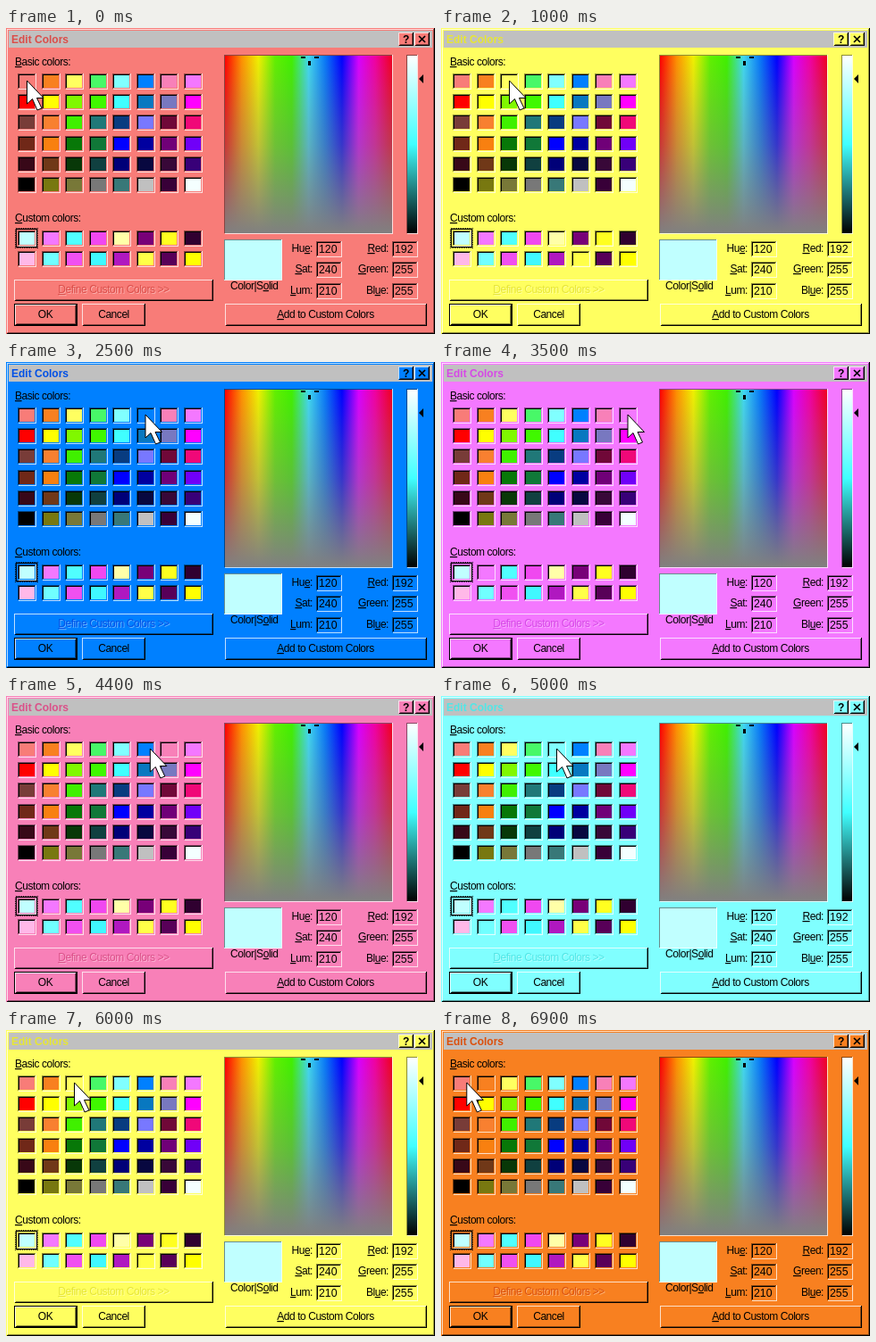
Write an HTML page that moves like this. It is 480 by 343 pixels and loops after 7000 ms.

```html
<!DOCTYPE html>
<html lang="en">
<head>
<meta charset="utf-8">
<title>Edit Colors</title>
<style>
  html, body { margin: 0; width: 100%; height: 100%; overflow: hidden; }
  svg { display: block; width: 480px; height: 343px; --face: #f87c78; --dim: #d44a46; }
  text { font: 12px "Liberation Sans", Arial, sans-serif; letter-spacing: -.45px; fill: #000; white-space: pre; }
  .title { font-weight: bold; letter-spacing: 0; fill: var(--dim); }
  .value { font-size: 12.3px; letter-spacing: 0; }
  .face { fill: var(--face); }
  .none { fill: none; }
  .hi { fill: none; stroke: #fff; stroke-opacity: .75; }
  .lo { fill: none; stroke: #000; stroke-opacity: .45; }
  .dark { fill: none; stroke: #000; }
  .u { text-decoration: underline; }
  rect, .hi, .lo, .dark { shape-rendering: crispEdges; }
</style>
</head>
<body>
<svg id="stage" viewBox="0 0 480 343"></svg>
<script>
const stage = document.getElementById('stage');
const basic = [
  'f87c78 f88020 ffff60 48f868 80ffff 0080ff f880b8 f478ff',
  'ff0000 ffff00 80f800 40f800 40ffff 0878c0 7878c0 ff00ff',
  '783c38 f88030 40f000 207878 083c80 7878ff 700838 f00878',
  '702818 f88010 087808 107838 0000ff 0000a0 700078 7000f8',
  '380818 703818 083808 104040 000078 080840 380838 380078',
  '000000 787810 787838 787878 387878 c0c0c0 380038 f4ffff'
].map(row => row.split(' '));
const custom = [
  'c0ffff f478ff 50ffff f048f0 ffffa8 780078 ffff20 300030',
  'ffb8e8 70ffff f050f0 40f8ff b018c0 ffff48 580058 ffff00'
].map(row => row.split(' '));
const PITCH = 26.5;

const rect = (x, y, w, h, fill) =>
  `<rect x="${x}" y="${y}" width="${w}" height="${h}" ${fill ? `fill="${fill}"` : 'class="face"'}/>`;

// One-pixel frame: first class on the top and left, second on the bottom and right
const edge = (x, y, w, h, tl, br) =>
  `<path class="${tl}" d="M${x + .5} ${y + h - 1}V${y + .5}H${x + w - 1}"/>` +
  `<path class="${br}" d="M${x + .5} ${y + h - .5}H${x + w - .5}V${y}"/>`;

const raised = (x, y, w, h) => rect(x, y, w, h) +
  edge(x, y, w, h, 'hi', 'dark') + edge(x + 1, y + 1, w - 2, h - 2, 'none', 'lo');

const inset = (x, y, w, h, fill) => rect(x, y, w, h, fill) + edge(x, y, w, h, 'lo', 'hi');

const sunken = (x, y, w, h, fill) => inset(x, y, w, h) +
  rect(x + 1, y + 1, w - 3, h - 3, fill) + edge(x + 1, y + 1, w - 2, h - 2, 'dark', 'none');

// An ampersand marks the underlined letter
const text = (x, y, s, attrs = '') =>
  `<text x="${x}" y="${y}" ${attrs}>${s.replace(/&(\w)(?!t;)/, '<tspan class="u">$1</tspan>')}</text>`;
const mid = 'text-anchor="middle"';
const end = 'text-anchor="end"';

const swatches = (rows, top) => rows.map((row, j) => row.map((c, i) =>
  sunken(Math.round(13 + i * PITCH), Math.round(top + j * 23.2), 21, 18, '#' + c)
).join('')).join('');

const field = (x, y, label, value) =>
  text(x - 4, y + 12, label, end) + sunken(x, y, 29, 18) + text(x + 3, y + 13, value, 'class="value"');

const stops = list => list.map((c, i) =>
  `<stop offset="${i / (list.length - 1)}" stop-color="${c}"/>`).join('');

const hues = ['#f00', '#ff9000', '#f0f000', '#60f000', '#40f000', '#40d8f0',
  '#0878f8', '#00f', '#d800ff', '#f000a0', '#f00020'];
const defs = `<defs>
  <linearGradient id="hue">${stops(hues)}</linearGradient>
  <linearGradient id="gray" x2="0" y2="1">
    <stop stop-color="#808080" stop-opacity="0"/>
    <stop offset=".5" stop-color="#808080" stop-opacity=".42"/>
    <stop offset="1" stop-color="#808080"/>
  </linearGradient>
  <linearGradient id="lum" x2="0" y2="1">${stops(['#fff', '#40ffff', '#000'])}</linearGradient>
</defs>`;

const titleBar = rect(3, 3, 474, 19, '#c0c0c0') +
  text(6, 17, 'Edit Colors', 'class="title"') +
  raised(439, 5, 17, 15) + raised(457, 5, 17, 15) +
  text(447.5, 17, '?', mid + ' style="font-weight:bold"') +
  '<path d="M462 9l7 7M469 9l-7 7" stroke="#000" stroke-width="1.7"/>';

const picker = inset(244, 30, 189, 201) +
  rect(245, 31, 187, 199, 'url(#hue)') + rect(245, 31, 187, 199, 'url(#gray)') +
  rect(330, 32, 5, 2, '#000') + rect(345, 32, 5, 2, '#000') + rect(338, 37, 3, 5, '#000') +
  inset(448, 30, 13, 201) + rect(449, 31, 11, 199, 'url(#lum)') +
  '<path d="M462 57l5-5v10z"/>';

const preview = inset(244, 237, 65, 46, '#c0ffff') + text(251, 293, 'Color|S&olid');

const fields =
  field(347, 239, 'Hu&e:', '120') + field(347, 262, '&Sat:', '240') + field(347, 286, '&Lum:', '210') +
  field(432, 239, '&Red:', '192') + field(432, 262, '&Green:', '255') + field(432, 286, 'Bl&ue:', '255');

const define = '&Define Custom Colors &gt;&gt;';
const buttons = raised(9, 282, 223, 24) +
  text(121.5, 298, define, mid + ' style="fill:#fff;fill-opacity:.4"') +
  text(120.5, 297, define, mid + ' style="fill:var(--dim)"') +
  raised(10, 310, 69, 23) + '<rect class="dark" x="9.5" y="309.5" width="70" height="24"/>' +
  text(44, 325, 'OK', mid) +
  raised(85, 309, 71, 25) + text(120.5, 325, 'Cancel', mid) +
  raised(245, 309, 226, 25) + text(357.5, 325, '&Add to Custom Colors', mid);

stage.innerHTML = defs + rect(0, 0, 480, 343) +
  edge(0, 0, 480, 343, 'none', 'dark') + edge(1, 1, 478, 341, 'hi', 'lo') +
  titleBar +
  text(10, 42, '&Basic colors:') + swatches(basic, 51) +
  text(10, 217, '&Custom colors:') + swatches(custom, 227) +
  '<rect class="dark" x="10.5" y="224.5" width="25" height="22" stroke-dasharray="1 1"/>' +
  '<rect class="dark" x="11.5" y="225.5" width="23" height="20"/>' +
  picker + preview + fields + buttons +
  `<path id="pointer" d="M0 0V26L6 20.5L11.5 33L16.5 31L11 19.5H18.5Z"
    fill="#fff" stroke="#000"/>`;

const pointer = document.getElementById('pointer');
const LAST = basic[0].length - 1;
const bounce = n => LAST - Math.abs(LAST - n % (2 * LAST));

// Darker, more saturated shade for the title and the disabled label
const dim = hex => `rgb(${hex.match(/../g).map(h => {
  const v = parseInt(h, 16) / 255;
  return Math.round(255 * v * (.35 + .55 * v));
})})`;

// The pointer takes five steps to each swatch; the dialog recolors on arrival
function draw(ms) {
  const tick = Math.floor(ms % 7000 / 100);
  const color = basic[0][bounce(Math.floor(tick / 5))];
  stage.style.setProperty('--face', '#' + color);
  stage.style.setProperty('--dim', dim(color));
  pointer.setAttribute('transform', `translate(${(23.5 + bounce(tick / 5) * PITCH).toFixed(1)} 59)`);
}

const start = performance.now();
function loop() {
  draw(performance.now() - start);
  requestAnimationFrame(loop);
}
loop();
</script>
</body>
</html>
```
